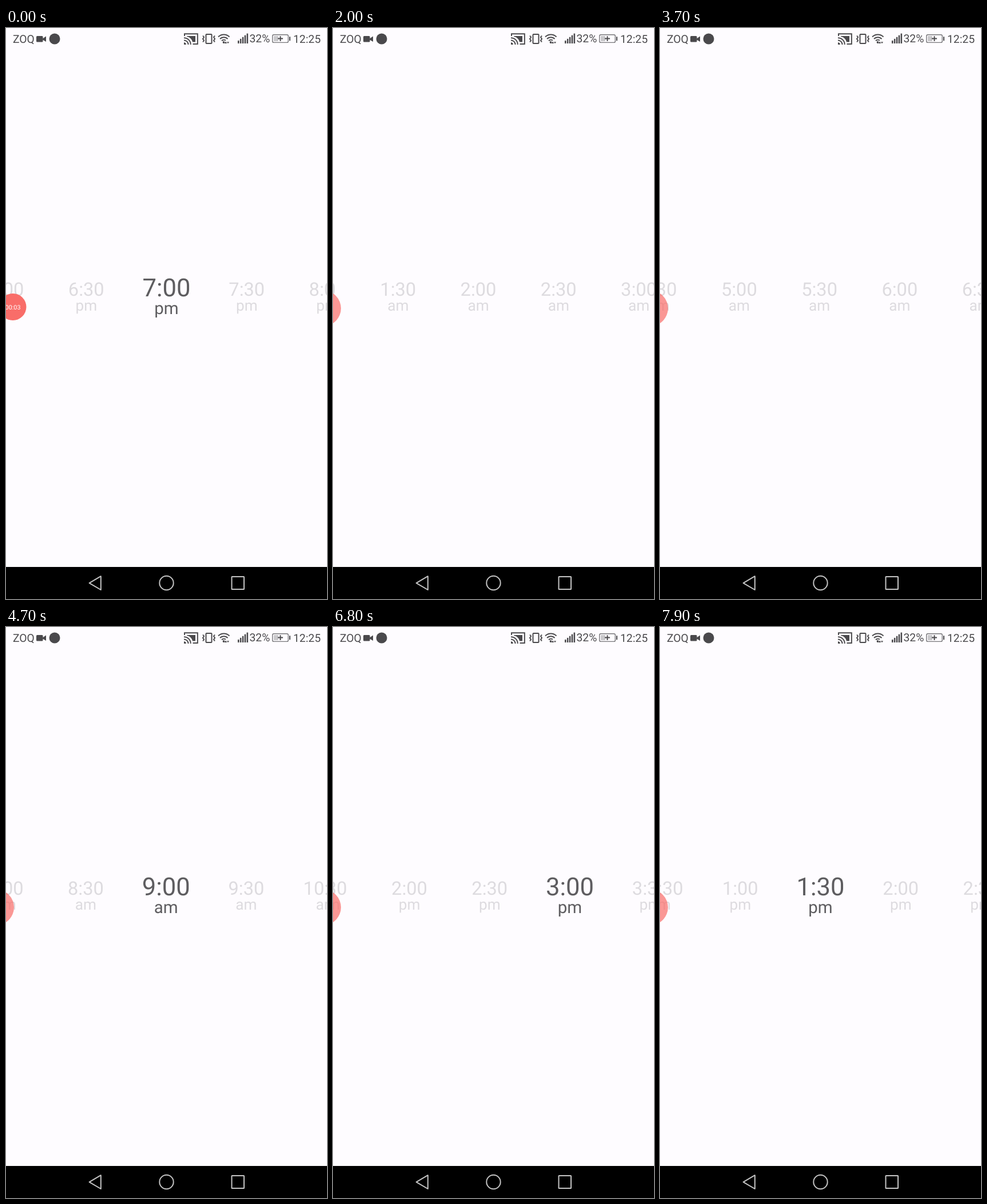
These frames come from a looping animation (561 px wide and 998 px high, 8 s). An HTML page:

```html
<!DOCTYPE html>
<html lang="en">
<head>
<meta charset="utf-8">
<title>Time picker</title>
<style>
  html, body { margin: 0; width: 100%; height: 100%; overflow: hidden; background: #fefcff; }
  svg { display: block; width: 100%; height: 100%; }
  text { font-family: Roboto, "Liberation Sans", sans-serif; text-rendering: geometricPrecision; }
  .status { fill: #4a494c; font-size: 19.3px; }
  .icon { fill: none; stroke: #4a494c; stroke-width: 2; }
  .solid { fill: #4a494c; }
  .nav { fill: none; stroke: #c4c4c4; stroke-width: 2; }
  .slot { fill: #dddbdf; text-anchor: middle; }
  .slot .time { font-size: 32.6px; }
  .slot .half { font-size: 26.2px; }
  .slot.on { fill: #5e5d60; }
  .slot.on .time { font-size: 43.6px; }
  .slot.on .half { font-size: 29.5px; }
</style>
</head>
<body>
<svg viewBox="0 0 561 998" xmlns="http://www.w3.org/2000/svg">
  <rect width="561" height="998" fill="#fefcff"/>

  <g id="status">
    <text class="status" x="12" y="26">ZOQ</text>
    <rect class="solid" x="53" y="14" width="11.5" height="10.5" rx="1.5"/>
    <path class="solid" d="M64 18.5L70 14.5V24L64 20.5Z"/>
    <circle class="solid" cx="85" cy="19" r="9.5"/>

    <!-- cast -->
    <path class="icon" d="M312 14V10.2H334.8V28H326.5"/>
    <path class="solid" d="M316 14H331V24.5H326C325 19.5 321 15.8 316 15Z"/>
    <path class="icon" d="M311 17.2A11.8 11.8 0 0 1 322.8 29M311 21.4A7.6 7.6 0 0 1 318.6 29"/>
    <path class="solid" d="M311 25.2A3.8 3.8 0 0 1 314.8 29H311Z"/>

    <!-- vibrate -->
    <rect class="icon" x="349.5" y="11" width="10" height="16" rx="1"/>
    <path class="icon" d="M344 13.5L346 16L344 19L346 22L344 24.5M365 13.5L363 16L365 19L363 22L365 24.5" stroke-width="1.7"/>

    <!-- wifi -->
    <path class="icon" d="M371 15.5A14 14 0 0 1 390.5 15.5M374 19A9.5 9.5 0 0 1 387.5 19M377 22.3A5.2 5.2 0 0 1 384 21.8" stroke-width="1.8"/>
    <circle class="solid" cx="380.5" cy="25" r="1.9"/>
    <path class="solid" d="M384 23.5L386.3 26.8H384.9V27H383.2V26.8H381.8ZM388 27.2L386 24.2H390Z"/>

    <g id="bars"></g>
    <text class="status" x="425.5" y="25" font-size="19">32%</text>

    <!-- battery -->
    <rect x="465.7" y="11.8" width="27.6" height="13.6" rx="2.5" fill="none" stroke="#77767a" stroke-width="1.4"/>
    <rect x="468" y="14" width="8" height="9.2" fill="#c9c8cb"/>
    <rect class="solid" x="495" y="15" width="2" height="7.5" rx="1"/>
    <path class="icon" d="M475 18.6H484M479.5 14.2V23" stroke-width="2.2"/>
    <text class="status" x="502" y="26">12:25</text>
  </g>

  <g id="slots"></g>

  <g id="badge">
    <circle fill="#f96d69"/>
    <text x="12" y="491.5" font-size="10.8" fill="#fff" text-anchor="middle"></text>
  </g>

  <rect y="942" width="561" height="56" fill="#000"/>
  <path class="nav" d="M165.8 958.2V982L145.6 970.1Z" stroke-linejoin="round"/>
  <circle class="nav" cx="280.5" cy="970" r="12.2"/>
  <rect class="nav" x="394.5" y="959" width="21.5" height="22" rx=".5"/>
</svg>

<script>
const LOOP = 8000, STEP = 100, GAP = 140.25, MID = 280.5;

// [ms, wheel position in half hours since midnight]
const path = [
  [0, 38], [100, 38.3], [250, 40.2], [500, 44.8], [800, 48], [1100, 49.075],
  [1300, 49], [1400, 49.01], [1700, 49.5], [1850, 50.5], [2100, 53.3], [2350, 55.2],
  [2600, 55.93], [2900, 56], [3300, 56], [3500, 56.8], [3800, 60.3], [4100, 63.7],
  [4400, 65.6], [4600, 66], [4700, 66.006], [4950, 66.5], [5100, 67.6], [5300, 71.8],
  [5500, 75.8], [5700, 77.735], [6100, 78], [6250, 78], [6500, 77.8], [6800, 77.048],
  [7100, 76], [7400, 75.3], [7800, 75.01], [7900, 75], [8000, 75]
];
// [ms, chosen half hour]
const picks = [[0, 38], [1300, 49], [2900, 56], [4600, 66], [6200, 78], [7900, 75]];

const svgNS = "http://www.w3.org/2000/svg";
const byId = id => document.getElementById(id);
function add(parent, tag, attrs = {}) {
  const el = document.createElementNS(svgNS, tag);
  set(el, attrs);
  return parent.appendChild(el);
}
function set(el, attrs) {
  for (const k in attrs) el.setAttribute(k, attrs[k]);
}
const mix = (a, b, u) => a + (b - a) * u;
const clamp = u => Math.min(1, Math.max(0, u));

for (let i = 0; i < 5; i++) {
  const h = 5 + i * 3.1;
  add(byId("bars"), "rect", { class: "solid", x: 405 + i * 3.9, y: 27 - h, width: 2.5, height: h });
}

const slots = Array.from({ length: 6 }, () => {
  const g = add(byId("slots"), "g");
  return { g, time: add(g, "text", { class: "time" }), half: add(g, "text", { class: "half" }) };
});
const [disc, clock] = byId("badge").children;

const slope = path.slice(1).map(([t, v], i) => (v - path[i][1]) / (t - path[i][0]));
// Harmonic mean keeps the curve from overshooting its points.
const tangent = path.map((_, i) => {
  const a = slope[i - 1], b = slope[i];
  return a * b > 0 ? 2 * a * b / (a + b) : 0;
});

function wheelAt(t) {
  let i = 0;
  while (i < slope.length - 1 && t >= path[i + 1][0]) i++;
  const [t0, v0] = path[i], [t1, v1] = path[i + 1];
  const d = t1 - t0, u = (t - t0) / d, w = 1 - u;
  return v0 * (1 + 2 * u) * w * w + v1 * u * u * (3 - 2 * u)
    + d * (tangent[i] * u * w * w - tangent[i + 1] * u * u * w);
}

function drawSlots(t) {
  const pos = wheelAt(t);
  const pick = picks.filter(p => p[0] <= t).pop()[1];
  const first = Math.round(pos) - 3;
  slots.forEach((s, i) => {
    const n = first + i + (pos > first + 3 ? 1 : 0);
    const hour = Math.floor(n / 2), on = n === pick;
    set(s.g, {
      class: on ? "slot on" : "slot",
      transform: `translate(${(MID + (n - pos) * GAP).toFixed(2)} 0)`
    });
    s.time.textContent = `${hour % 12 || 12}:${n % 2 ? "30" : "00"}`;
    s.half.textContent = hour % 24 < 12 ? "am" : "pm";
    set(s.time, { y: on ? 469 : 468 });
    set(s.half, { y: on ? 500 : 493.7 });
  });
}

function drawBadge(t) {
  const u = clamp((t - 1600) / 400);
  set(disc, {
    cx: mix(12, -17, u), cy: mix(487.5, 490, u), r: mix(23.5, 31, u),
    opacity: mix(1, 0.7, u)
  });
  clock.textContent = t < 800 ? "00:03" : "00:04";
  set(clock, { opacity: u > 0 ? 0 : 1 });
}

const start = performance.now();
function frame() {
  const now = Math.max(0, performance.now() - start) % LOOP;
  const t = Math.floor(now / STEP) * STEP;
  drawSlots(t);
  drawBadge(t);
  requestAnimationFrame(frame);
}
frame();
</script>
</body>
</html>
```
